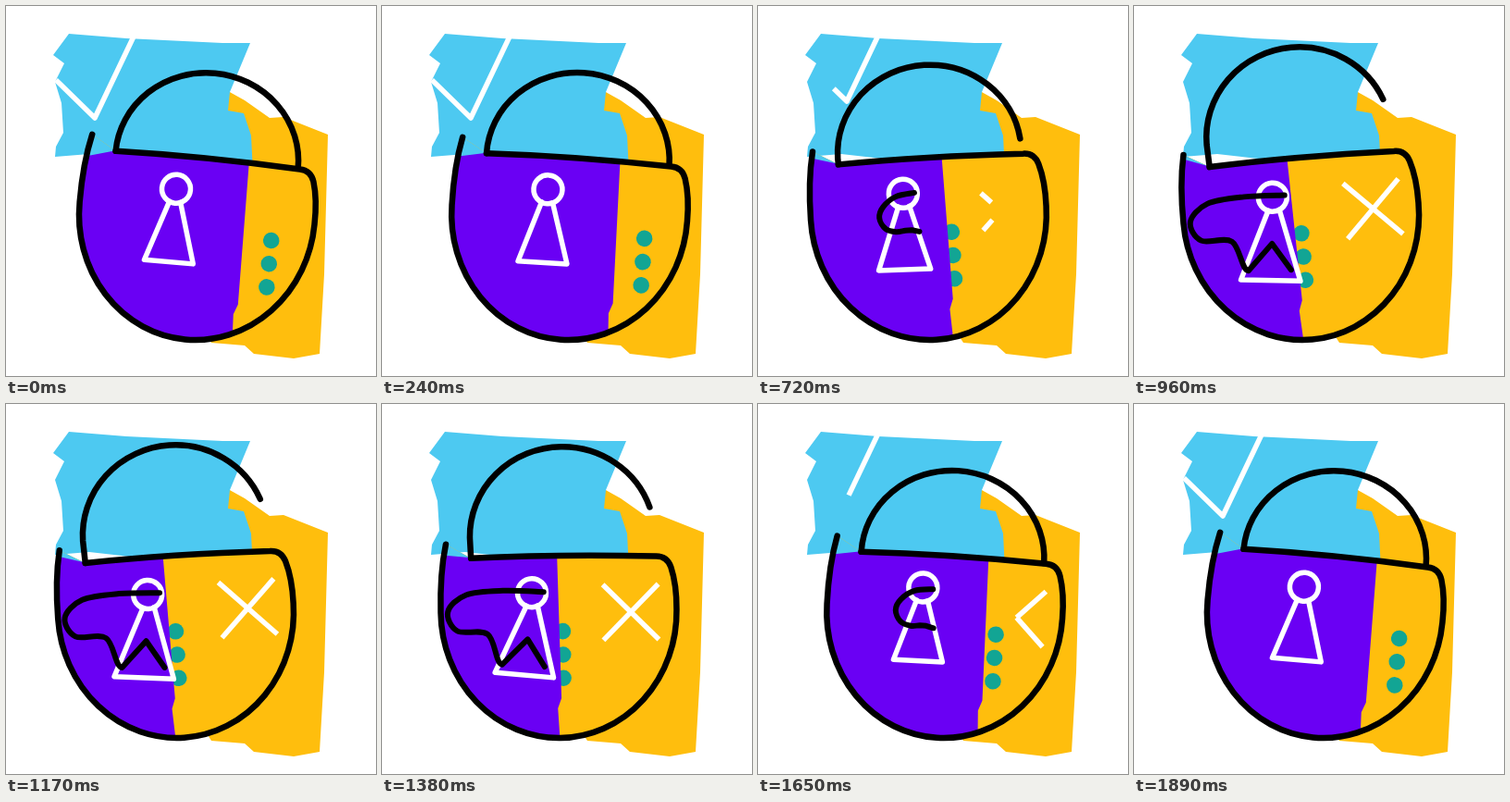
Write an HTML page with a canvas that moves like this. It is 400x400 px and loops after 1.92 s.

```html
<!DOCTYPE html>
<html lang="en">
<head>
<meta charset="utf-8">
<title>Rocking padlock</title>
<style>
html, body { margin: 0; width: 100%; height: 100%; overflow: hidden; background: #fff; }
canvas { display: block; width: 400px; height: 400px; }
</style>
</head>
<body>
<canvas id="stage" width="400" height="400"></canvas>
<script>
const g = document.getElementById('stage').getContext('2d');
const LOOP = 1920, STEP = 30;
const CYAN = '#4dc9f1', YELLOW = '#ffbe0d', PURPLE = '#6a00f4', TEAL = '#12a594';

const points = list => list.split(' ').map(p => p.split(',').map(Number));
const cyanPanel = points('68,30 130,35 234,40 264,40 242,93 240,113 257,116 265,140 267,180 90,160 53,163 54,152 62,137 60,105 53,82 63,62 51,53');
const yellowPanel = points('240,92 258,102 285,121 300,120 348,139 344,290 339,376 311,381 268,376 258,367 222,364 200,330 200,150');
const checkMark = points('54,80 96,121 138,33');
const hook = points('-14,-31 -34,-28 -48,-18 -53,-6 -47,6 -36,10 -26,9 -19,9 -11,11');
const key = points('-16,-29 -60,-31 -100,-27 -120,-9 -110,12 -77,16 -62,49 -34,22 -16,52');

const mix = (a, b, k) => a + (b - a) * k;
const morph = (a, b, k) => a.map((p, i) => [mix(p[0], b[i][0], k), mix(p[1], b[i][1], k)]);
const ease = (t, from, to) => {
  const u = Math.min(1, Math.max(0, (t - from) / (to - from)));
  return u * u * (3 - 2 * u);
};
// Rises from 0 to 1 between a and b, falls back between c and d.
const hold = (t, a, b, c, d) => ease(t, a, b) - ease(t, c, d);

function trace(pts) {
  g.beginPath();
  pts.forEach(p => g.lineTo(...p));
}

function fill(color) {
  g.fillStyle = color;
  g.fill();
}

function stroke(color, width) {
  g.strokeStyle = color;
  g.lineWidth = width;
  g.stroke();
}

// Strokes only the given share of a polyline.
function trim(pts, from, to) {
  const length = pts.slice(1).reduce((sum, p, i) => sum + Math.hypot(p[0] - pts[i][0], p[1] - pts[i][1]), 0);
  if (to - from < 0.03) return;
  g.save();
  g.lineCap = 'butt';
  g.setLineDash([(to - from) * length, length]);
  g.lineDashOffset = -from * length;
  trace(pts);
  stroke('#fff', 5.5);
  g.restore();
}

function drawCheck(t) {
  const rise = 18 * hold(t, 480, 720, 1650, 1890);
  trim(checkMark.map(([x, y]) => [x, y - rise]), hold(t, 580, 1010, 1380, 1860), 1);
}

function traceBody() {
  g.beginPath();
  g.moveTo(-121, -82);
  g.quadraticCurveTo(-128, -50, -127.5, -8);
  g.ellipse(0, -8, 127.5, 137, 0, Math.PI, 0, true);
  g.quadraticCurveTo(128, -35, 122, -54);
  g.quadraticCurveTo(118, -66, 106, -66);
  g.quadraticCurveTo(0, -70, -94, -66.5);
}

function drawFace(t, tilt) {
  const edge = mix(50.5, -10, hold(t, 530, 890, 1262, 1753)), foot = edge + 3;
  g.save();
  traceBody();
  g.clip();
  g.fillStyle = YELLOW;
  g.fillRect(-140, -90, 280, 230);
  g.fillStyle = CYAN;
  g.fillRect(-140, -90, 46, 60);
  drawDots(t);
  // The left corner of the purple side stays level while the body tilts.
  trace([[-130, -69 + 130 * tilt], [-94, -67], [-94, -80], [edge, -80], [foot, 86], [foot - 4, 97],
    [foot - 2, 135], [-140, 135]]);
  fill(PURPLE);
  g.restore();
}

function drawDots(t) {
  const x = mix(82.6, -1.5, hold(t, 440, 880, 1290, 1860));
  for (const row of [-1, 0, 1]) {
    g.beginPath();
    g.arc(x, 39 + row * 25.3, 8.8, 0, 7);
    fill(TEAL);
  }
}

function drawKeyhole(open) {
  const x = mix(-25, -29, open), y = mix(-32, -28, open);
  g.beginPath();
  g.arc(x, y, 15.5, 0, 7);
  stroke('#fff', 5.5);
  trace([[x - 6, y + 14], [mix(-52, -71, open), mix(47.5, 58, open)],
    [mix(1, -7, open), mix(47, 65, open)], [x + 6, y + 14]]);
  stroke('#fff', 5.5);
}

function drawKey(t) {
  const size = hold(t, 590, 720, 1650, 1770);
  if (size < 0.05) return;
  const pts = morph(hook, key, hold(t, 710, 960, 1370, 1650)).map(([x, y]) => [mix(-12, x, size), y]);
  // Rounded up to the first tooth, straight after it.
  g.beginPath();
  g.moveTo(...pts[0]);
  for (let i = 0; i < 6; i++) {
    const a = pts[i - 1] || pts[i], b = pts[i], c = pts[i + 1], d = pts[i + 2];
    g.bezierCurveTo(b[0] + (c[0] - a[0]) / 6, b[1] + (c[1] - a[1]) / 6,
      c[0] - (d[0] - b[0]) / 6, c[1] - (d[1] - b[1]) / 6, ...c);
  }
  pts.slice(7).forEach(p => g.lineTo(...p));
  stroke('#000', 6);
}

function drawCross(t) {
  const x = 78, y = -6, r = 30;
  const grow = ease(t, 650, 910), gone = ease(t, 1560, 1740);
  trim([[x - r, y - r], [x + r, y + r]], Math.max(mix(0.2, 0, grow), gone), mix(0.2, 1, grow));
  trim([[x + r, y - r], [x - r, y + r]], mix(0.8, 0, grow), Math.min(mix(0.8, 1, grow), 1 - gone));
}

function drawShackle(open) {
  g.beginPath();
  g.moveTo(-94, -66.5);
  g.ellipse(5, -66.5 - 24 * open, 99 + open, 94 + 3 * open, 0, Math.PI, 2 * Math.PI - 0.34 * open);
  stroke('#000', 6.5);
}

function draw(t) {
  const sway = Math.cos(2 * Math.PI * t / LOOP);
  const tilt = 0.004 + 0.092 * sway;
  const open = hold(t, 590, 960, 1335, 1620);
  g.fillStyle = '#fff';
  g.fillRect(0, 0, 400, 400);
  g.lineCap = g.lineJoin = 'round';
  trace(yellowPanel);
  fill(YELLOW);
  trace(cyanPanel);
  fill(CYAN);
  drawCheck(t);

  g.save();
  g.translate(193.5 + 12.3 * sway, 232);
  g.rotate(tilt);
  drawFace(t, tilt);
  drawKeyhole(open);
  drawKey(t);
  drawCross(t);
  traceBody();
  stroke('#000', 6.5);
  drawShackle(open);
  g.restore();
}

const start = performance.now();
function tick() {
  const t = (performance.now() - start) % LOOP;
  draw(Math.floor(t / STEP) * STEP);
  requestAnimationFrame(tick);
}
tick();
</script>
</body>
</html>
```
